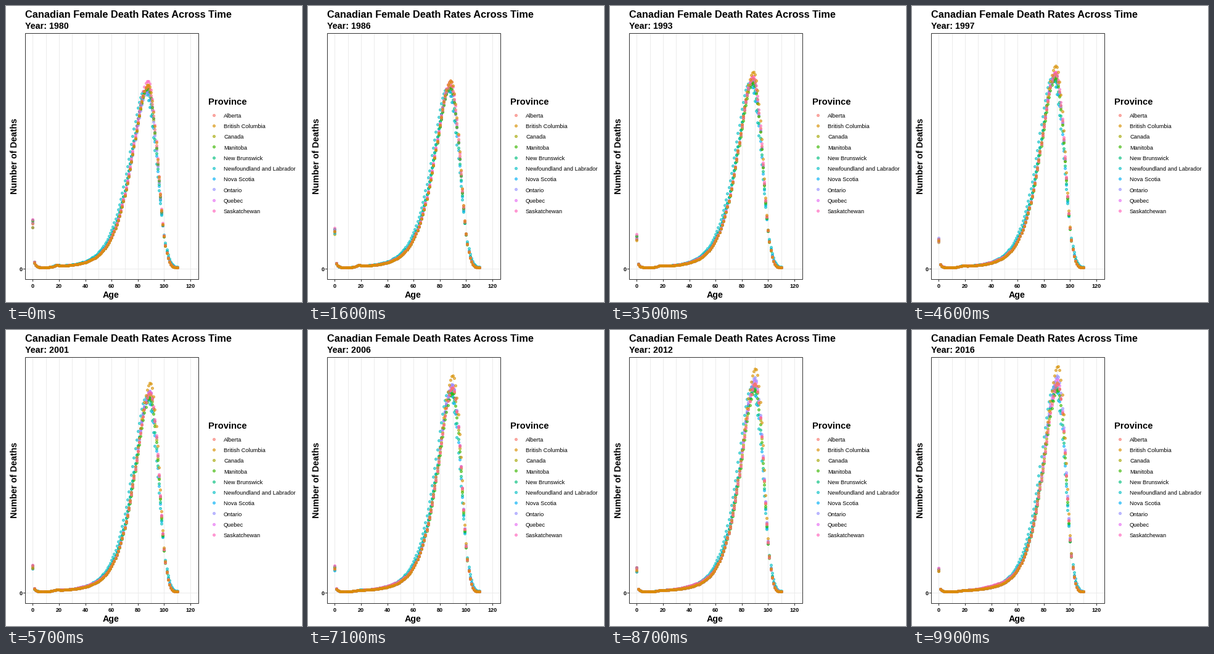
A matplotlib script that plays this animation: 480x480 px, repeating every 10 s.

```python
import numpy as np
import matplotlib.pyplot as plt
from matplotlib.animation import FuncAnimation
from matplotlib.colors import to_rgba
from matplotlib.patches import Rectangle

plt.rcParams["font.family"] = "Liberation Sans"

SIZE, DPI = 480, 72
FRAMES, INTERVAL = 100, 100
FIRST, LAST = 1980, 2016
X0, DX, Y0 = 43.97, 2.129, 426.5
ALPHA = 0.6
AGES = np.arange(111)

# Drawn east to west: peak above the mean at start and end, lead of the mode
PROVINCES = {
    "Canada": (0, -2, 0),
    "Newfoundland and Labrador": (-2, -8, -2.4),
    "Nova Scotia": (-3, -13, -0.9),
    "New Brunswick": (0, -10, -0.7),
    "Quebec": (4, 4, 0),
    "Ontario": (-3, 9, 0),
    "Manitoba": (2, -15, 0.1),
    "Saskatchewan": (14, -7, 0.3),
    "Alberta": (6, -4, 0.2),
    "British Columbia": (8, 24, 0.5),
}
HUES = ["#F8766D", "#D89000", "#A3A500", "#39B600", "#00BF7D",
        "#00BFC4", "#00B0F6", "#9590FF", "#E76BF3", "#FF62BC"]
COLORS = dict(zip(sorted(PROVINCES), HUES))

rng = np.random.default_rng(8)
YEARS = np.arange(FIRST, LAST + 1)
INFANT = {name: rng.uniform(0.87, 1.1) + rng.uniform(-0.06, 0.06, len(YEARS))
          for name in PROVINCES}


def ramp(center, width):
    return 1 / (1 + np.exp(-(AGES - center) / width))


def heights(name, t):
    start, end, lead = PROVINCES[name]
    peak = 288 + 52 * t * t * (3 - 2 * t) + start + (end - start) * t
    mode = 87.3 + 3 * t + lead

    # Gompertz deaths, with a different spread on each side of the mode
    d = AGES - mode
    u = d / (8.2 - 1.3 * t - 0.7 * lead)
    z = np.where(d < 0, d / (10 - t), u - 0.05 * u**2)
    old = peak * np.exp(1 + z - np.exp(z))

    # Where the peak lost ground, more deaths fall in midlife
    teens = 2 * (1 - t) * np.exp(-((AGES - 18) / 2.5) ** 2)
    middle = (2 + 0.2 * max(0, start - end)) * t * ramp(35, 5)
    h = 1.8 + old + (1.8 * ramp(16, 1.5) + teens + middle) * np.exp(-np.exp(z))

    infant = 33 + 41 * np.exp(-2.6 * t)
    infant *= np.interp(FIRST + t * (LAST - FIRST), YEARS, INFANT[name])
    h += 0.11 * infant * np.exp(-(AGES - 1) / 1.4)
    h[0] = infant
    return h


def pixel(v):
    return np.floor(v) + 0.5


def points(t):
    y = np.concatenate([Y0 - heights(name, t) for name in PROVINCES])
    x = np.tile(X0 + DX * AGES, len(PROVINCES))
    return pixel(np.column_stack([x, y]))


fig = plt.figure(figsize=(SIZE / DPI, SIZE / DPI), dpi=DPI, facecolor="white")
ax = fig.add_axes([0, 0, 1, 1])
ax.set_xlim(0, SIZE)
ax.set_ylim(SIZE, 0)
ax.axis("off")


def line(x, y, color, z):
    ax.plot(x, y, color=color, lw=1, zorder=z, solid_capstyle="butt",
            snap=False)


def label(x, y, s, size, weight="bold", **kw):
    return ax.text(x, y, s, fontsize=size, weight=weight, va="baseline", **kw)


def dots(xy, colors):
    rgba = [to_rgba(c, ALPHA) for c in colors]
    return ax.scatter(xy[:, 0], xy[:, 1], s=4.0**2, facecolors=rgba,
                      edgecolors=rgba, linewidths=1, zorder=3)


# Panel
for age in range(0, 121, 10):
    x = pixel(X0 + DX * age)
    line([x, x], [45, 443], "#EBEBEB", 1)
    if age % 20 == 0:
        line([x, x], [444, 447], "#333333", 4)
        label(x - 0.5, 457, str(age), 9, ha="center")
line([32, 312], [426.5, 426.5], "#EBEBEB", 1)
line([28, 31], [426.5, 426.5], "#333333", 4)
label(26.5, 430, "0", 9, ha="right")
ax.add_patch(Rectangle((31.5, 44.5), 281, 399, fill=False, ec="#333333",
                       lw=1, zorder=4, snap=False))

# Titles
label(31, 19, "Canadian Female Death Rates Across Time", 16.4)
subtitle = label(31, 37, "", 14.3)
label(170.5, 473, "Age", 14.2, ha="center")
label(18, 243.5, "Number of Deaths", 14.3, ha="center", rotation=90,
      rotation_mode="anchor")

# Legend
label(328, 160, "Province", 14.8)
rows = 177.2 + 17.25 * np.arange(len(COLORS))
for y, name in zip(rows, COLORS):
    label(353, y + 3.6, name, 9.2, weight="normal")
dots(pixel(np.column_stack([np.full(len(rows), 337), rows])), COLORS.values())

cloud = dots(points(0), np.repeat([COLORS[n] for n in PROVINCES], len(AGES)))


def update(i):
    t = i / (FRAMES - 1)
    cloud.set_offsets(points(t))
    subtitle.set_text(f"Year: {round(FIRST + (LAST - FIRST) * t)}")
    return cloud, subtitle


anim = FuncAnimation(fig, update, frames=FRAMES, interval=INTERVAL,
                     repeat=True, repeat_delay=0)
plt.show()
```
